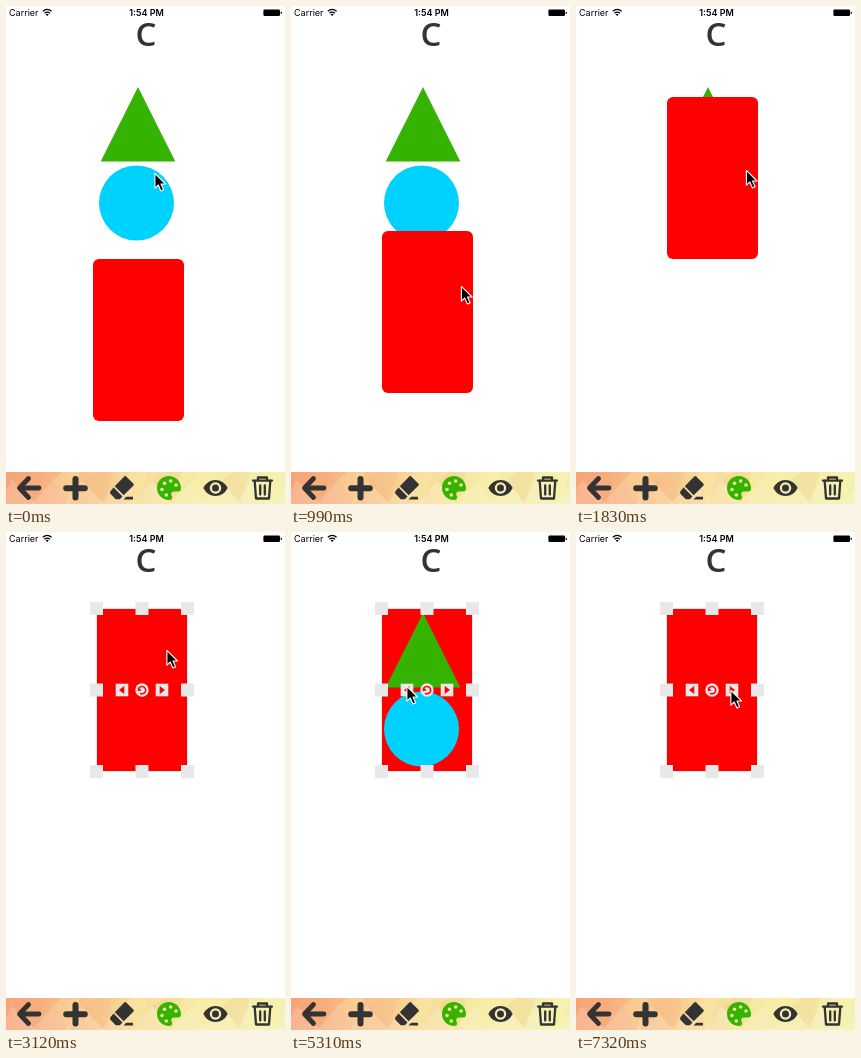
These frames come from a looping animation (279 by 498 pixels, 8610 ms). An HTML page:

```html
<!DOCTYPE html>
<html lang="en">
<head>
<meta charset="utf-8">
<title>Shape layers</title>
<style>
  html, body { margin: 0; width: 100%; height: 100%; overflow: hidden; background: #fff; }
  svg { display: block; width: 100%; height: 100%; }
  .status { font: 9px Inter, "Liberation Sans", sans-serif; }
  .title { font: 600 33px "Open Sans", "Noto Sans", sans-serif; fill: #333; }
</style>
</head>
<body>
<svg viewBox="0 0 279 498">
  <defs>
    <linearGradient id="warm">
      <stop offset="0" stop-color="#f6a478"/>
      <stop offset=".2" stop-color="#f7b985"/>
      <stop offset=".42" stop-color="#f6d697"/>
      <stop offset=".62" stop-color="#f6e9a2"/>
      <stop offset="1" stop-color="#f2f0b0"/>
    </linearGradient>
    <path id="tri" d="M132 81L169.3 155.5H94.7Z" fill="#34b400"/>
    <circle id="disc" cx="130.5" cy="197" r="37.5" fill="#00d2ff"/>
  </defs>
  <rect width="279" height="498" fill="#fff"/>

  <g class="status">
    <text x="3" y="10">Carrier</text>
    <text x="140.5" y="10" text-anchor="middle" font-weight="600">1:54 PM</text>
    <g fill="none" stroke="#000" stroke-width="1.3">
      <path d="M36.8 5.3Q41.2 1.6 45.6 5.3M38.5 7.2Q41.2 5 43.9 7.2"/>
    </g>
    <path d="M39.7 8.4Q41.2 7.3 42.7 8.4L41.2 10Z"/>
    <rect x="257.4" y="3.4" width="16.6" height="6.6" rx="1.2"/>
    <path d="M274.7 5.4q1.3 .1 1.3 1.3t-1.3 1.3Z"/>
  </g>
  <text class="title" x="140" y="40" text-anchor="middle">C</text>

  <use href="#tri"/>
  <use href="#disc"/>
  <rect id="block" width="91" height="162" rx="6" fill="#f00"/>
  <use id="triTop" href="#tri"/>
  <use id="discTop" href="#disc"/>

  <g id="frame">
    <rect x="90.5" y="76.5" width="91" height="163" fill="none" stroke="#e8e8e8"/>
    <g id="handles" fill="#e8e8e8"></g>
    <circle cx="136" cy="158" r="6.7" fill="#e8e8e8"/>
    <path d="M134 161.3A3.7 3.7 0 1 0 132.7 156.4" fill="none" stroke="#f00" stroke-width="1.5"/>
    <path d="M113 158L118.3 154V162ZM159 158L153.7 154V162ZM131.8 159.2V155.2L135.8 158.2Z" fill="#f00"/>
  </g>

  <g id="bar">
    <rect y="466" width="279" height="32" fill="url(#warm)"/>
    <g id="facets"></g>
    <g fill="#333">
      <path d="M22.5 472.5L13.5 482L22.5 491.5M14.5 482H33" fill="none" stroke="#333"
        stroke-width="4.8" stroke-linecap="round" stroke-linejoin="round"/>
      <path d="M69.5 473V491.5M60.2 482.2H78.8" stroke="#333" stroke-width="6" stroke-linecap="round"/>
      <path d="M118.5 470.3Q119.3 469.7 120.2 470.4L127.5 477.8Q128.3 478.7 127.5 479.6L117.7 489.3L108.8 480.2Z"/>
      <path d="M107.6 481.4L116.5 490.5L113.8 493.2H109.8L104.6 488Q103.3 486.5 104.6 485Z"/>
      <path d="M117.5 493.4L120.2 490.7H127V493.4Z"/>
      <path d="M197.3 482Q201.5 474 209.5 474T221.7 482Q217.5 490 209.5 490T197.3 482Z
        M209.5 476.3a5.7 5.7 0 1 0 .01 0Z" fill-rule="evenodd"/>
      <circle cx="209.5" cy="482" r="3.5"/>
      <g fill="none" stroke="#333" stroke-width="2.3" stroke-linejoin="round" stroke-linecap="round">
        <path d="M247 474.6H266M252 474V471.5H261V474"/>
        <path d="M248.7 475L250 492.5H263L264.3 475M254.2 479.5V488.5M258.8 479.5V488.5"/>
      </g>
    </g>
    <path d="M163 470C156 470 151 475.4 151 482S156.4 494 163 494C166 494 166.7 491.8 165.6 489.8
      C164.4 487.4 166 485.4 168.6 485.6H172C174.2 485.6 175.2 484 175 481.6C174.5 475 169.4 470 163 470Z" fill="#34b400"/>
    <g id="wells" fill="#f6e5a0"></g>
  </g>

  <path id="cursor" d="M.9 1.4V16.2L4.3 13L6.9 19L9.6 17.8L7 12H11.6Z"
    fill="#000" stroke="#fff" stroke-width="1.1" stroke-linejoin="round"/>
</svg>
<script>
const LOOP = 8610, STEP = 30;
const $ = id => document.getElementById(id);

function add(parent, tag, attrs) {
  const el = document.createElementNS("http://www.w3.org/2000/svg", tag);
  for (const key in attrs) el.setAttribute(key, attrs[key]);
  $(parent).append(el);
}

// Resize handles around the edge plus the two layer buttons
const xs = [90.5, 136, 181.5], ys = [76.5, 158, 239.5];
const square = (x, y, s) => add("handles", "rect", { x: x - s / 2, y: y - s / 2, width: s, height: s });
xs.forEach((x, i) => ys.forEach((y, j) => { if (i !== 1 || j !== 1) square(x, y, 13); }));
[116, 156].forEach(x => square(x, 158, 12.6));

[[156, 483.5], [158.5, 477.3], [164.7, 475], [170, 479], [160.3, 489]]
  .forEach(([cx, cy]) => add("wells", "circle", { cx, cy, r: 1.8 }));

// Faint triangles across the toolbar
for (let i = 0; i < 9; i++) {
  const x = i * 34 - 8, lean = 14 + i * 7 % 12;
  add("facets", "path", { d: `M${x} 498L${x + lean} 474L${x + 38} 498Z`, fill: "#fff", opacity: .17 });
  add("facets", "path", {
    d: `M${x + lean} 474L${x + 30} 466H${x + 48}L${x + 38} 498Z`,
    fill: i % 2 ? "#fff3b0" : "#f59a70", opacity: i % 2 ? .3 : .13
  });
}

// Keys: time, x, y, and "s" for a smooth approach
const cursorKeys = [
  [60, 148, 166], [690, 166, 325, "s"], [780, 166, 325], [900, 173, 312], [930, 172, 303],
  [990, 169.5, 279], [1140, 169.5, 260, "s"], [1290, 169.5, 260], [1500, 169.5, 190, "s"],
  [1650, 169.5, 190], [1830, 169.5, 163], [2190, 169, 149, "s"],
  [2760, 169, 149], [3030, 160, 117, "s"], [3420, 160, 117], [4080, 115, 153, "s"],
  [5550, 115, 153], [5730, 154, 161, "s"], [5910, 154, 161], [6150, 154, 157, "s"]
];
const blockKeys = [
  [840, 87, 253], [900, 89, 249], [930, 91, 242.5], [990, 91, 225], [1140, 91, 188.5, "s"],
  [1290, 91, 188.5], [1500, 91, 118, "s"], [1650, 91, 118], [1830, 91, 91], [2190, 90.5, 77, "s"]
];

function place(keys, t) {
  const i = keys.findIndex(k => k[0] > t);
  if (i === 0) return keys[0].slice(1, 3);
  if (i < 0) return keys[keys.length - 1].slice(1, 3);
  const a = keys[i - 1], b = keys[i];
  let p = (t - a[0]) / (b[0] - a[0]);
  if (b[3]) {
    const moving = i > 1 && (a[1] !== keys[i - 2][1] || a[2] !== keys[i - 2][2]);
    p = moving ? 1 - (1 - p) ** 2 : p * p * (3 - 2 * p);
  }
  return [a[1] + (b[1] - a[1]) * p, a[2] + (b[2] - a[2]) * p];
}

const move = (id, [x, y]) => $(id).setAttribute("transform", `translate(${x} ${y})`);
const show = (id, on) => $(id).setAttribute("visibility", on ? "visible" : "hidden");

function draw(ms) {
  const t = Math.floor(ms % LOOP / STEP) * STEP;
  move("cursor", place(cursorKeys, t));
  move("block", place(blockKeys, t));
  show("frame", t >= 3120);
  show("discTop", t >= 4260 && t < 7320);
  show("triTop", t >= 5310 && t < 6450);
}

const start = performance.now();
function tick() {
  draw(performance.now() - start);
  requestAnimationFrame(tick);
}
tick();
</script>
</body>
</html>
```
